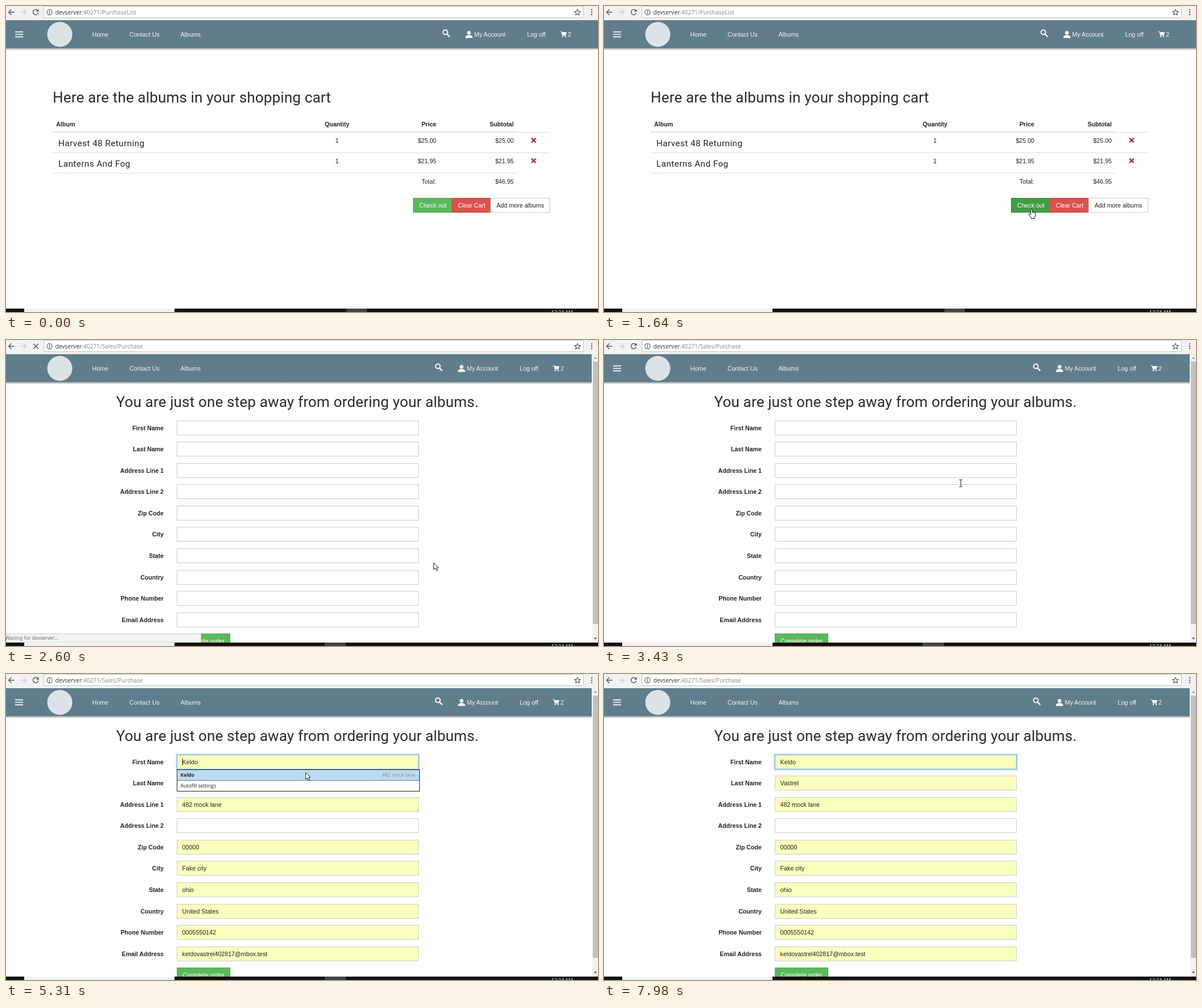
Write an HTML page that moves like this. It is 1040x539 px and loops after 8 s.

```html
<!DOCTYPE html>
<html lang="en">
<head>
<meta charset="utf-8">
<title>Checkout</title>
<style>
html, body { margin: 0; width: 100%; height: 100%; overflow: hidden; background: #fefefe; }
svg { display: block; width: 1040px; height: 539px; }
text { font: 10.66px "Liberation Sans", Arial, sans-serif; fill: #222; white-space: pre; }
.nav text, #tools text { fill: #f4f6f7; }
.r { text-anchor: end; }
.m { text-anchor: middle; }
.h { font: 26px Roboto, sans-serif; letter-spacing: .17px; fill: #2b2b2b; }
.album { font: 15.2px Roboto, sans-serif; letter-spacing: .47px; }
.ui { font: 8.7px "Open Sans", "Noto Sans", sans-serif; }
.url { font-size: 10.2px; fill: #888; }
.url tspan { fill: #333; }
.b { font-weight: bold; }
.w { fill: #fff; }
.dim { fill: #666; }
.line { fill: none; stroke: #555; stroke-width: 1.4; }

/* Timed parts: hard switches on one 8 s loop */
.t { animation: 8s step-end infinite; }
.cart { animation-name: cart; }
.form { animation-name: form; }
.hover { animation-name: hover; }
.menu { animation-name: menu; }
.reload { animation-name: reload; }
.stop { animation-name: stop; }
.task1 { animation-name: task1; }
.task2 { animation-name: task2; }
.focus { animation-name: focus; }
.filled { animation-name: filled; }
.popup { animation-name: popup; }
.caret1 { animation-name: caret1; }
.caret2 { animation-name: caret2; }
.arrow { animation-name: arrow; }
.beam { animation-name: beam; }
.status { animation: status 8s linear infinite; }
.cursor { animation: move 8s ease-in-out infinite; }

@keyframes cart { 0% { opacity: 1 } 27.875%, 100% { opacity: 0 } }
@keyframes form { 0% { opacity: 0 } 27.875%, 100% { opacity: 1 } }
@keyframes hover { 0%, 27.875%, 100% { opacity: 0 } 18.5% { opacity: 1 } }
@keyframes menu { 0%, 33.625%, 100% { opacity: 1 } 27.875% { opacity: 0 } }
@keyframes reload { 0%, 33.625%, 100% { opacity: 1 } 24.25% { opacity: 0 } }
@keyframes stop { 0%, 33.625%, 100% { opacity: 0 } 24.25% { opacity: 1 } }
@keyframes task1 { 0% { opacity: 1 } 25%, 100% { opacity: 0 } }
@keyframes task2 { 0%, 99.75%, 100% { opacity: 0 } 25% { opacity: 1 } }
@keyframes focus { 0% { opacity: 0 } 58.5%, 100% { opacity: 1 } }
@keyframes filled { 0% { opacity: 0 } 64.1%, 100% { opacity: 1 } }
@keyframes popup { 0%, 76.2%, 100% { opacity: 0 } 58.5% { opacity: 1 } }
@keyframes caret1 { 0%, 67.06%, 75.875%, 100% { opacity: 0 } 58.125%, 73.5% { opacity: 1 } }
@keyframes caret2 { 0%, 83%, 95.875%, 100% { opacity: 0 } 76.375%, 89.5% { opacity: 1 } }
@keyframes arrow {
  0%, 18.5%, 41.375%, 82.6%, 93.75%, 100% { opacity: 0 }
  5.625%, 27.875%, 64.1%, 90.9% { opacity: 1 }
}
@keyframes beam { 0%, 64.1%, 90.9%, 100% { opacity: 0 } 41.375%, 82.6% { opacity: 1 } }
@keyframes status { 0%, 22.125%, 38.375%, 100% { opacity: 0 } 23.375%, 36.625% { opacity: 1 } }
@keyframes move {
  0%, 5.625% { transform: translate(942px, 521px) }
  10.375%, 13.5% { transform: translate(851px, 451px) }
  19.5%, 27.875% { transform: translate(751px, 357px) }
  32%, 40.875% { transform: translate(751px, 392px) }
  44%, 47.25% { transform: translate(582px, 202px) }
  51.125%, 60.5% { transform: translate(522px, 146px) }
  65.5% { transform: translate(526px, 173px) }
  81.25% { transform: translate(526px, 173px); animation-timing-function: linear }
  84.25% { transform: translate(600px, 186px); animation-timing-function: ease-out }
  85.75%, 89.5% { transform: translate(616px, 198px) }
  93.75%, 100% { transform: translate(1036px, 168px) }
}
</style>
</head>
<body>
<svg viewBox="0 0 1040 539">
  <defs>
    <linearGradient id="shade" x2="0" y2="1">
      <stop stop-color="#000" stop-opacity=".4"/><stop offset="1" stop-color="#000" stop-opacity="0"/>
    </linearGradient>
    <g id="tools" fill="#fff">
      <circle cx="771.7" cy="46.2" r="4" fill="none" stroke="#fff" stroke-width="1.9"/>
      <path d="M774.5 49.3l5 5" stroke="#fff" stroke-width="2.3"/>
      <circle cx="813.3" cy="47.3" r="3.2"/>
      <path d="M807 56.3v-2q1-2.3 4.5-3h3.6q3.5.7 4.5 3v2z"/>
      <path d="M973.5 45h2.3l1.8 6.7h6.4" fill="none" stroke="#fff" stroke-width="1.1"/>
      <path d="M976 46h9l-1.2 4.7h-6.4z"/>
      <circle cx="978" cy="53.7" r="1.2"/><circle cx="983" cy="53.7" r="1.2"/>
      <text x="822.5" y="53.5">My Account</text>
      <text x="915.5" y="53.5">Log off</text>
      <text x="987" y="53.5">2</text>
    </g>
  </defs>
  <rect width="1040" height="539" fill="#fefefe"/>

  <g id="cart" class="t cart"></g>
  <g id="form" class="t form"></g>

  <!-- browser bar -->
  <rect width="1040" height="25" fill="#f2f2f2"/>
  <rect x="66.5" y=".5" width="948" height="20" rx="1.5" fill="#fff" stroke="#c3c3c3"/>
  <path class="line" d="M14.5 11H5M9.5 6L4.7 11l4.8 5"/>
  <path class="line" d="M25.5 11H35M30.5 6l4.8 5-4.8 5" style="stroke:#d0d0d0"/>
  <g class="t reload">
    <path class="line" d="M56 8.3A4.6 4.6 0 1 0 56.6 12"/><path d="M57.5 5.5v4.5H53z" fill="#555"/>
  </g>
  <path class="line t stop" d="M48 6.5l9 9M57 6.5l-9 9"/>
  <circle class="line" cx="76.5" cy="11" r="4.6" style="stroke-width:1.1"/>
  <path d="M76.5 8v1.4M76.5 10.3v3.4" stroke="#444" stroke-width="1.2"/>
  <path class="line" style="stroke-width:1.1" d="M1004 6l1.5 3.4 3.7.3-2.8 2.5.9 3.6-3.3-2-3.3 2 .9-3.6-2.8-2.5 3.7-.3z"/>
  <g fill="#555"><circle cx="1029" cy="7" r="1.2"/><circle cx="1029" cy="11" r="1.2"/><circle cx="1029" cy="15" r="1.2"/></g>
  <text class="ui url t cart" x="86.5" y="14.5"><tspan>devserver</tspan>:40271/PurchaseList</text>
  <text class="ui url t form" x="86.5" y="14.5"><tspan>devserver</tspan>:40271/Sales/Purchase</text>

  <!-- shared navigation -->
  <g class="nav">
    <path class="t menu" d="M16 45.7h14M16 50h14M16 54.3h14" stroke="#fff" stroke-width="1.7"/>
    <circle cx="94.5" cy="50" r="22" fill="#dce3e6"/>
    <text x="151.5" y="53.5">Home</text>
    <text x="217" y="53.5">Contact Us</text>
    <text x="306.5" y="53.5">Albums</text>
  </g>

  <!-- status bubble -->
  <g class="status">
    <path d="M0 517.5H342.5V533H0z" fill="#f2f2f2" stroke="#cfcfcf"/>
    <text class="ui dim t cart" x="-1" y="528">devserver:40271/Sales/Purchase</text>
    <text class="ui dim t form" x="-1" y="528">Waiting for devserver...</text>
  </g>

  <!-- taskbar -->
  <rect y="533" width="1040" height="6" fill="#141112"/>
  <rect x="32" y="533" width="264" height="6" fill="#f2f2f2"/>
  <rect class="t task1" x="598" y="533" width="36" height="6" fill="#444"/>
  <rect class="t task2" x="560" y="533" width="37" height="6" fill="#444"/>
  <text class="ui w" x="958" y="543">12:24 AM</text>

  <!-- pointer -->
  <g class="cursor">
    <path class="t arrow" d="M.5.5V12.5l2.8-2.6 2 4.6 2-.9-2-4.4h3.8z" fill="#fff" stroke="#222"/>
    <path class="t hover" d="M-1.3 10.5V1.5q1.3-1.7 2.6 0v5q1.3-.9 2.2.4 1.3-.7 2 .6 1.5-.3 1.6 1.3v4.2L5.7 15v2.5H-.8V15.3L-4.8 10.2q.6-1.9 2.2-.8z" fill="#fff" stroke="#111"/>
    <path class="t beam" d="M-2.8-6H-.5L0-5.5.5-6H2.8M0-5.5V5.5M-2.8 6H-.5L0 5.5.5 6H2.8" fill="none" stroke="#222" stroke-width="1.1"/>
  </g>
</svg>
<script>
const text = (s, x, y, cls = '') => `<text class="${cls}" x="${x}" y="${y}">${s}</text>`;
const box = (x, y, w, h, fill, stroke, cls = '') =>
  `<rect class="${cls}" x="${x + .5}" y="${y + .5}" width="${w - 1}" height="${h - 1}" fill="${fill}" stroke="${stroke}"/>`;
const header = (width, shift) =>
  `<rect y="25" width="${width}" height="49" fill="#607d8b"/>
   <rect y="74" width="${width}" height="4" fill="url(#shade)"/>
   <use href="#tools" x="${shift}"/>`;

const items = [['Harvest 48 Returning', '$25.00'], ['Lanterns And Fog', '$21.95']];
document.getElementById('cart').innerHTML = header(1040, 0) +
  text('Here are the albums in your shopping cart', 82, 170, 'h') +
  text('Album', 88, 212, 'b') + text('Quantity', 581.5, 212, 'b m') +
  text('Price', 756, 212, 'b r') + text('Subtotal', 892, 212, 'b r') +
  '<path d="M82 222.5H956M82 258.5H956M82 294.5H898" stroke="#ddd"/>' +
  '<path d="M82 221.8H898" stroke="#ddd"/>' +
  items.map(([name, price], i) => {
    const y = 241 + 36 * i;
    return text(name, 92, y + 6, 'album') + text(1, 581.5, y, 'm') +
      text(price, 756, y, 'r') + text(price, 892, y, 'r') +
      `<path d="M923.3 ${y - 8.2}l7.4 7.4m0-7.4l-7.4 7.4" stroke="#a03c30" stroke-width="2.6"/>`;
  }).join('') +
  text('Total:', 755.5, 313, 'r') + text('$46.95', 892, 313, 'r') +
  box(715, 338, 69, 26, '#5cb85c', '#4cae4c') +
  box(715, 338, 69, 26, '#449d44', '#398439', 't hover') +
  box(783, 338, 69, 26, '#d9534f', '#d43f3a') +
  box(851, 338, 105, 26, '#fff', '#ccc') +
  text('Check out', 750, 355, 'w m') + text('Clear Cart', 818, 355, 'w m') +
  text('Add more albums', 903.5, 355, 'm');

const fields = [
  ['First Name', 'Keldo'], ['Last Name', 'Vastrel'], ['Address Line 1', '482 mock lane'],
  ['Address Line 2', ''], ['Zip Code', '00000'], ['City', 'Fake city'], ['State', 'ohio'],
  ['Country', 'United States'], ['Phone Number', '0005550142'],
  ['Email Address', 'keldovastrel402817@mbox.test']
];
const rowTop = i => Math.round(141.6 + 37.56 * i);
document.getElementById('form').innerHTML =
  '<rect width="1040" height="539" fill="#fefefe"/>' + header(1029, -13) +
  text('You are just one step away from ordering your albums.', 193.5, 118, 'h') +
  fields.map(([label, value], i) => {
    const y = rowTop(i);
    return text(label, 277, y + 17, 'b r') + box(300, y, 425, 26, '#fff', '#ccc') +
      (value && `<g class="t filled">${box(300, y, 425, 26, '#faffbd', '#ccc')}${text(value, 309.6, y + 17)}</g>`);
  }).join('') +
  `<g class="t focus">
     <rect x="299.5" y="141.5" width="426" height="27" rx="1" fill="none" stroke="#66afe9" stroke-opacity=".35" stroke-width="3"/>
     ${box(300, 142, 425, 26, 'none', '#66afe9')}
   </g>
   <rect class="t caret1" x="309.5" y="149" width="1" height="12" fill="#222"/>
   <rect class="t caret2" x="337" y="149" width="1" height="12" fill="#222"/>` +
  box(300, 517, 94, 26, '#5cb85c', '#4cae4c') + text('Complete order', 347, 534, 'w m') +
  `<g class="t popup">
     ${box(300, 168, 427, 39, '#fff', '#222')}
     <rect class="t filled" x="301" y="169" width="425" height="18" fill="#bddaf4"/>
     <path d="M301 187.5H726" stroke="#777"/>
     ${text('Keldo', 306.5, 181, 'ui b')}
     <g opacity=".65">${text('482 mock lane', 719, 181, 'ui dim r')}</g>
     ${text('Autofill settings', 306.5, 200, 'ui')}
   </g>
   <rect x="1030" y="25" width="10" height="508" fill="#f1f1f1"/>
   <rect x="1031" y="38" width="9" height="462" fill="#c1c1c1"/>
   <path d="M1033 33l2.5-3 2.5 3z" fill="#888"/>
   <path d="M1033 524.5l2.5 3 2.5-3z" fill="#444"/>`;
</script>
</body>
</html>
```
